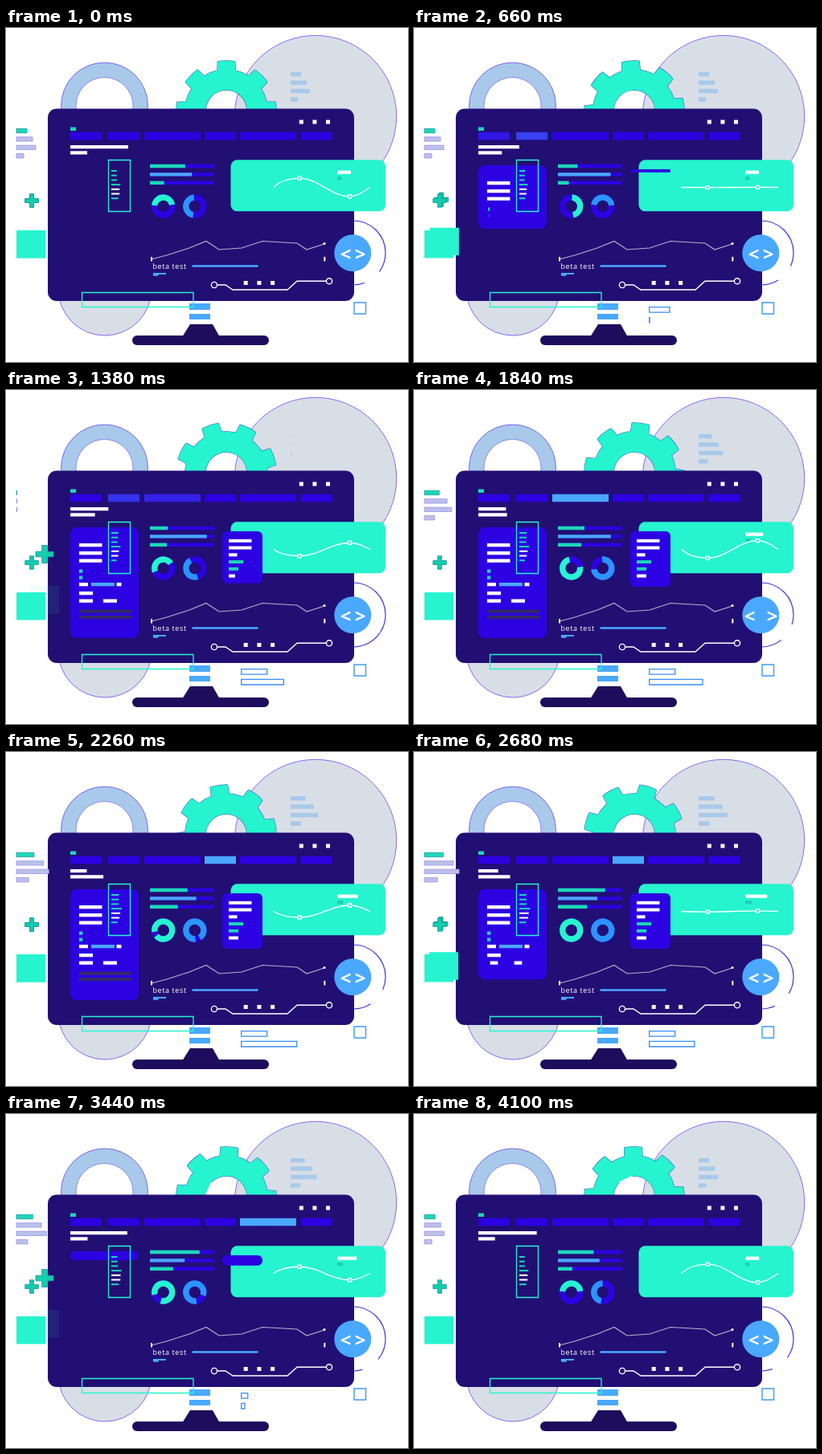
An HTML page with a canvas that plays this animation: 500x416 px, repeating every 4.12 s.

```html
<!DOCTYPE html>
<html lang="en">
<head>
<meta charset="utf-8">
<title>Dashboard</title>
<style>
html, body { margin: 0; width: 500px; height: 416px; overflow: hidden; background: #fff; }
canvas { display: block; }
</style>
</head>
<body>
<canvas id="stage" width="500" height="416"></canvas>
<script>
const g = document.getElementById('stage').getContext('2d');
const LOOP = 4120, HALF = LOOP / 2, RAD = Math.PI / 180;
const TEAL = '#26f4cf', MINT = '#1bd8b6', NAVY = '#220f74', BLUE = '#2c02e2', SKY = '#4aa8ff',
      PALE = '#a8c9ea', GREY = '#d8dee6', BASE = '#1d0d5c', EDGE = '#6a4cf0', RIM = '#1490a0', WHITE = '#fff';
let t = 0;

const clamp = x => Math.max(0, Math.min(1, x));
const smooth = x => (x = clamp(x), x * x * (3 - 2 * x));

// cubic-bezier(.25, .1, .25, 1)
function ease(x) {
  x = clamp(x);
  let lo = 0, hi = 1, s;
  for (let i = 0; i < 20; i++) {
    s = (lo + hi) / 2;
    if (.75 * s * (1 - s) + s ** 3 < x) lo = s; else hi = s;
  }
  return .3 * s * (1 - s) ** 2 + 3 * (1 - s) * s * s + s ** 3;
}

// One cosine cycle per loop, highest at the angle `peak`
const wave = (mid, amp, peak) => mid + amp * Math.cos((t / LOOP * 360 - peak) * RAD);
// 0 to 1 and back, each way with its start and duration
const reveal = (open, openFor, close, closeFor) => ease((t - open) / openFor) - ease((t - close) / closeFor);
// 1, dropping briefly to 0 a third of the way through
const dip = () => clamp(Math.abs(t - 1370) / 350);
// Shrinks away at the dip, then grows beyond its rest size
const regrow = gain => dip() * (1 + gain * Math.max(0, Math.sin((t - 1370) / 2750 * Math.PI)));

function paint(fill, stroke, width = 1) {
  if (fill) { g.fillStyle = fill; g.fill(); }
  if (stroke) { g.strokeStyle = stroke; g.lineWidth = width; g.stroke(); }
}
function box(x, y, w, h, fill, stroke, width, r = 0) {
  if (w < .3 || h < .3) return;
  g.beginPath();
  g.roundRect(x, y, w, h, Math.min(r, w / 2, h / 2));
  paint(fill, stroke, width);
}
function disc(x, y, r, fill, stroke, width) {
  g.beginPath();
  g.arc(x, y, r, 0, 7);
  paint(fill, stroke, width);
}
function line(points, color, width) {
  g.beginPath();
  points.forEach(p => g.lineTo(...p));
  paint(null, color, width);
}
// Arc in degrees, clockwise from the top
function arc(x, y, r, from, to, color, width) {
  g.beginPath();
  g.arc(x, y, r, (from - 90) * RAD, (to - 90) * RAD);
  paint(null, color, width);
}

function gear() {
  const p = t / LOOP;
  g.save();
  g.translate(274, 103);
  g.rotate((225 * p + 5 * Math.sin(4 * Math.PI * p)) * RAD);
  g.beginPath();
  for (let a = -90; a < 270; a += 45) {
    g.arc(0, 0, 50.5, (a - 33) * RAD, (a - 12) * RAD);
    g.arc(0, 0, 61.5, (a - 9.5) * RAD, (a + 9.5) * RAD);
  }
  g.closePath();
  g.moveTo(26.5, 0);
  g.arc(0, 0, 26.5, 0, 7, true);
  g.lineJoin = 'round';
  paint(null, '#3a55d0', 2.6);
  g.fillStyle = TEAL;
  g.fill('evenodd');
  paint(null, TEAL, 1.6);
  g.restore();
}

function bars(x, gain, style) {
  [13, 20, 24, 9].forEach((w, i) => box(x, style.y + i * 10.4, w * regrow(gain), 5.4, ...style.look(i)));
}

function backdrop() {
  disc(385, 110, 100.7, GREY, EDGE, .8);
  disc(123, 325, 58, GREY, EDGE, .8);
  disc(122.5, 97, 54, PALE, EDGE, .8);
  disc(122.5, 97, 35.5, WHITE, EDGE, .6);
  gear();
  bars(354, .5, { y: 55, look: () => [PALE] });
  const mid = wave(135, 12, -50), gap = 17 * dip();
  arc(432, 280, 40, 0, mid - gap, '#4038e0', 1.2);
  arc(432, 280, 40, mid + gap, 180, '#4038e0', 1.2);
}

function monitor() {
  box(52, 100.5, 381, 239.5, NAVY, null, 0, 11);
  box(157, 383, 170, 12, BASE, null, 0, 6);
  g.beginPath();
  [[229, 369], [257, 369], [266, 385], [219, 385]].forEach(p => g.lineTo(...p));
  paint(BASE);
  box(228, 343, 26, 8, SKY);
  box(228, 356, 26, 7, SKY);
  for (let i = 0; i < 3; i++) box(364.8 + i * 16.6, 114.5, 5, 5, WHITE);
  box(80, 123.5, 7, 4.5, MINT);
}

// Tabs light up one after another
function nav() {
  [[80, 39], [127, 39], [172, 70], [247, 39], [291, 70], [366.5, 39]].forEach(([x, w], i) => {
    const from = Math.max(60, 750 * i - 110), to = Math.min(4060, 750 * i + 640);
    box(x, 129.8, w, 9.5, BLUE);
    g.globalAlpha = clamp(.25 + Math.min(t - from, to - t) / 160);
    box(x, 129.8, w, 9.5, SKY);
    g.globalAlpha = 1;
  });
  const a = 2 * Math.PI * t / LOOP, sway = Math.cos(a) - .5 * Math.sin(2 * a);
  box(80, 146, 49 + 23 * sway, 4.2, WHITE);
  box(80, 153.3, 30 - 9 * sway, 4.2, WHITE);
}

function meters() {
  [[wave(42, 22, 275), MINT], [wave(57, 14, 110), SKY], [wave(25, 11.5, 230), MINT]].forEach(([w, color], i) => {
    const y = 169.8 + i * 10.4;
    box(179, y, 80, 4.4, BLUE);
    box(179, y, w, 4.4, color);
  });
  const p = t / LOOP;
  const turn = 1080 * smooth(p * 1.1);
  const len = 165 + 195 * Math.max(0, Math.sin((p - .33) / .67 * Math.PI));
  const donut = (x, start, color) => {
    arc(x, 222, 11, 0, 360, BLUE, 7.4);
    arc(x, 222, 11, start + turn, start + turn + len, color, 7.4);
  };
  donut(195.7, -85, TEAL);
  donut(234.8, 190, '#2b95ff');
}

function chart() {
  line([[181, 288], [200, 283], [228, 274], [249, 265.5], [265, 276], [293, 274],
    [319, 265.5], [362, 268], [374, 276], [396, 269]], '#b4b1c6', 1.2);
  box(180, 285, 2, 5.5, WHITE);
  box(395.3, 285, 2, 5.5, WHITE);
  disc(396, 268.5, 1.6, WHITE);
  g.fillStyle = WHITE;
  g.font = '9px "Open Sans", "Noto Sans", sans-serif';
  g.letterSpacing = '0.6px';
  g.fillText('beta test', 182.5, 300);
  box(231.5, 295.3, 82, 2.5, SKY);
  box(183, 305, 16, 2, SKY);
  box(183, 306.8, 6.5, 2, SKY);
  line([[263, 320], [273, 320], [282, 326], [350, 326], [362, 315.3], [398, 315.3]], WHITE, 1.4);
  disc(259, 320, 3.6, null, WHITE, 1.4);
  disc(402, 315.3, 3.6, null, WHITE, 1.4);
  for (let i = 0; i < 3; i++) box(295.7 + i * 16.7, 315, 5, 5, WHITE);
}

function tallPanel() {
  const h = 138 * reveal(280, 1150, 2455, 1500);
  box(80, 171, 85, h, BLUE, null, 0, 8);
  const row = (x, y, w, color) => {
    const s = clamp((171 + h * 1.2 - y - 32) / 23);
    box(x + w * (1 - s) / 2, y, w * s, 4.3, color);
  };
  for (const y of [191, 201, 210.5]) row(91, y, 28.5, WHITE);
  for (const y of [223.5, 231.5]) row(91, y, 4.3, MINT);
  row(91, 240, 11, WHITE);
  row(106, 240, 29, SKY);
  row(137.5, 240, 6, WHITE);
  row(91, 251, 17, WHITE);
  row(91, 260.5, 17, WHITE);
  row(121, 260.5, 17, WHITE);
  for (const y of [273.5, 281]) row(91, y, 65, '#33296a');
}

function listFrame() {
  box(127.5, 164.5, 27, 64, null, TEAL, 1.3);
  [8, 8, 8, 12, 10.5, 10, 8].forEach((w, i) =>
    box(131, 177 + i * 5.7, wave(w, 1.4, 180 + i * 20), 2, i == 4 || i == 5 ? WHITE : MINT));
}

function waveCard() {
  box(279.5, 164.3, 192.5, 64, TEAL, null, 0, 8);
  const w = 17 * regrow(.6);
  box(412, 177.6, w, 4.2, WHITE);
  box(412, 185, w * .3, 4.2, '#1fcfb4');

  // The curve flips over in each half of the loop
  const flip = 1 - (1 - t % HALF / HALF) ** 1.8;
  const amp = 11.3 * (1 - 2 * flip) * (t < HALF ? 1 : -1);
  const y = 198.5, up = y - amp, down = y + amp;
  g.beginPath();
  g.moveTo(332.5, y);
  g.bezierCurveTo(341, y - amp * .7, 352, up, 365, up);
  g.bezierCurveTo(389, up, 404, down, 427.5, down);
  g.bezierCurveTo(440, down, 448, y + amp * .2, 453, y);
  paint(null, WHITE, 1.3);
  box(363, up - 2, 4, 4, TEAL, WHITE, 1.3);
  box(425.5, down - 2, 4, 4, TEAL, WHITE, 1.3);
}

function smallPanel() {
  const h = 69 * reveal(580, 1150, 2850, 1150);
  box(269, 176, 50, h, BLUE, null, 0, 6);
  [28.5, 28.5, 10.5, 18, 12, 12].forEach((w, i) => {
    const y = 185.8 + i * 8.75;
    box(277, y, w * clamp((176 + h - y - 4) / 11), 4, i == 3 || i == 4 ? MINT : WHITE);
  });
}

function plus(x, y, size) {
  const a = size / 2, b = size * .15;
  g.beginPath();
  [[-b, -a], [b, -a], [b, -b], [a, -b], [a, b], [b, b], [b, a], [-b, a], [-b, b], [-a, b], [-a, -b], [-b, -b]]
    .forEach(([dx, dy]) => g.lineTo(x + dx, y + dy));
  g.closePath();
  paint('#14cdad', RIM, .8);
}

function leftSide() {
  bars(13, .8, { y: 125.3, look: i => i ? ['#b9c2e8', '#9a86ee', .7] : [MINT, RIM, .7] });

  // A copy slides off each shape and fades, twice per loop
  const q = t % HALF;
  const rise = smooth((q - 450) / 930);
  g.globalAlpha = clamp((1700 - q) / 320);
  plus(32 + 16 * rise, 215 - 10.5 * rise, 16.5 + 5.5 * rise);
  g.globalAlpha = 1;
  plus(32, 215, 16.5);

  const slide = smooth((q - 120) / 1260);
  g.globalAlpha = clamp((1440 - q) / 700);
  box(13 + 17.5 * slide, 252 - 8 * slide, 36, 34.5, TEAL);
  g.globalAlpha = 1;
  box(13, 252, 36, 34.5, TEAL);
}

function codeBadge() {
  disc(431.3, 280.3, 23, SKY);
  const spread = 9 + 5 * clamp(1 - Math.abs(t - 1840) / 400);
  g.fillStyle = WHITE;
  g.font = 'bold 24px "Open Sans", "Noto Sans", sans-serif';
  g.letterSpacing = '0px';
  g.textAlign = 'center';
  g.fillText('<', 431.5 - spread, 289.5);
  g.fillText('>', 431.5 + spread, 289.5);
  g.textAlign = 'left';
}

function outlines() {
  box(94.5, 329.5, 138.5, 18, null, TEAL, 1.3);
  box(433, 342, 14.5, 14, null, '#3c9cf4', 1.4);
  box(292.7, 347.6, 32 * reveal(100, 1150, 2900, 1200), 6.6, null, '#3a8df2', 1.3);
  box(292.7, 360.4, 69 * reveal(640, 1600, 2470, 1400), 6.6, null, '#3a8df2', 1.3);
}

const layers = [backdrop, monitor, nav, meters, chart, tallPanel, listFrame, waveCard,
  smallPanel, leftSide, codeBadge, outlines];

function frame(now) {
  t = now % LOOP;
  g.fillStyle = WHITE;
  g.fillRect(0, 0, 500, 416);
  layers.forEach(draw => draw());
  requestAnimationFrame(frame);
}
frame(performance.now());
</script>
</body>
</html>
```
